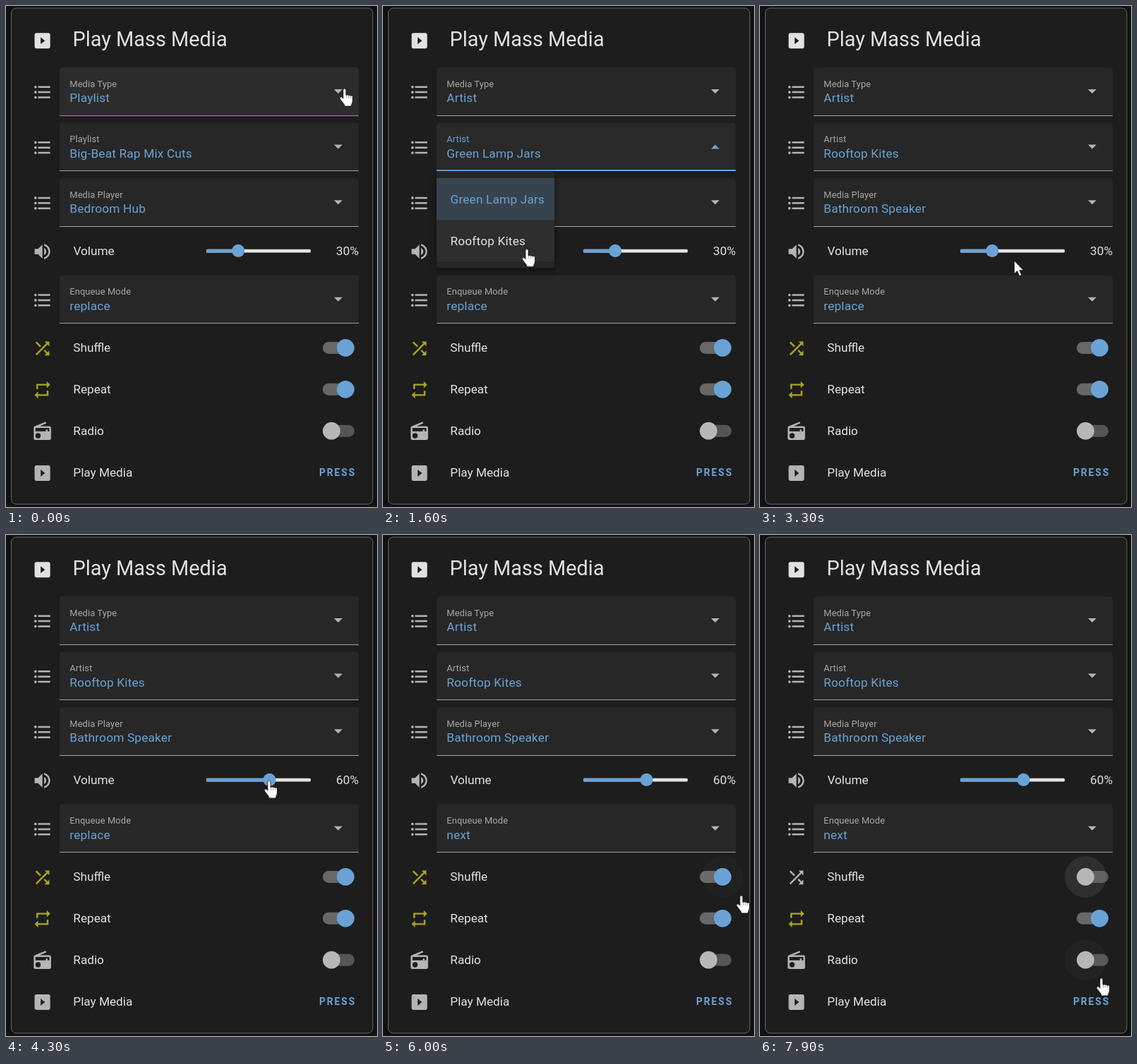
Recreate the animation shown at these times as an HTML page. Size 526 by 710 pixels, loop 8000 ms.

```html
<!DOCTYPE html>
<html lang="en">
<head>
<meta charset="utf-8">
<title>Play Mass Media</title>
<style>
html, body { margin: 0; width: 100%; height: 100%; overflow: hidden; background: #111; }
svg { display: block; width: 526px; height: 710px; font: 17.2px Roboto, sans-serif; }
.val, .item { font-size: 17.3px; letter-spacing: .16px; }
.label { font-size: 12.9px; letter-spacing: .1px; }
.press { font-size: 14px; font-weight: 600; letter-spacing: 1.8px; }
.menu { filter: drop-shadow(0 4px 5px rgba(0, 0, 0, .4)); }
</style>
</head>
<body>
<svg id="stage" viewBox="0 0 526 710"></svg>
<script>
const stage = document.getElementById('stage');
const LOOP = 8000, TICK = 100, SCALE = 1.229;
const BLUE = '#6aa2d5', TEXT = '#e1e1e1', GREY = '#b4b4b4', OLIVE = '#a9a621';
const LEFT = 76, RIGHT = 500, FIELD_H = 68.6, ITEM_H = 59, PAD = 9.8;

const dot = y => `M4,${y - 1.5}a1.5,1.5 0 0 1 0,3a1.5,1.5 0 0 1 0,-3M7,${y - 1}h14v2h-14z`;
const ICONS = {
  list: dot(6) + dot(12) + dot(18),
  play: 'M19,3H5C3.89,3 3,3.89 3,5V19A2,2 0 0,0 5,21H19A2,2 0 0,0 21,19V5C21,3.89 20.1,3 19,3M10,16V8L15,12',
  volume: 'M14,3.23V5.29C16.89,6.15 19,8.83 19,12C19,15.17 16.89,17.84 14,18.7V20.77C18,19.86 21,16.28 21,12C21,7.72 18,4.14 14,3.23M16.5,12C16.5,10.23 15.5,8.71 14,7.97V16C15.5,15.29 16.5,13.76 16.5,12M3,9V15H7L12,20V4L7,9H3Z',
  shuffle: 'M14.83,13.41L13.42,14.82L16.55,17.95L14.5,20H20V14.5L17.96,16.54L14.83,13.41M14.5,4L16.54,6.04L4,18.59L5.41,20L17.96,7.46L20,9.5V4M10.59,9.17L5.41,4L4,5.41L9.17,10.58L10.59,9.17Z',
  repeat: 'M17,17H7V14L3,18L7,22V19H19V13H17M7,7H17V10L21,6L17,2V5H5V11H7V7Z',
  radio: 'M20,6A2,2 0 0,1 22,8V20A2,2 0 0,1 20,22H4A2,2 0 0,1 2,20V8C2,7.15 2.53,6.42 3.28,6.13L15.71,1L16.47,2.83L8.83,6H20M20,8H4V12H16V10H18V12H20V8M7,14A3,3 0 0,0 4,17A3,3 0 0,0 7,20A3,3 0 0,0 10,17A3,3 0 0,0 7,14Z'
};

// Each select: open and close times, and the value before and after the choice.
const FIELDS = [
  { y: 86.8, label: () => 'Media Type', open: 200, close: 800, from: 'Playlist', to: 'Artist', w: 138,
    items: ['Artist', 'Album', 'Track', 'Playlist', 'Radio'] },
  { y: 165.4, label: t => t < 800 ? 'Playlist' : 'Artist', open: 1400, close: 1800,
    from: 'Green Lamp Jars', to: 'Rooftop Kites', w: 167, items: ['Green Lamp Jars', 'Rooftop Kites'] },
  { y: 244, label: () => 'Media Player', open: 2400, close: 3000, from: 'Bedroom Hub', to: 'Bathroom Speaker',
    w: 255, scroll: true,
    items: ['All Speakers', 'Bathroom Speaker', 'Bedroom Hub', 'Broadcast Speakers',
      'Deck Soundbridge', 'Dining Room Hub', 'HASS Media Player'] },
  { y: 381.6, label: () => 'Enqueue Mode', open: 4800, close: 5300, from: 'replace', to: 'next', w: 138,
    items: ['play', 'replace', 'next', 'replace_next', 'add'] }
];

// Pointer path: time, x, y of the hot spot.
const PATH = [
  [0, 480, 117], [200, 479, 119], [600, 150, 196], [800, 146, 198], [1300, 470, 203], [1400, 468, 204],
  [1600, 204, 344.5], [1800, 200, 343], [2300, 462, 284], [2400, 452, 286], [2600, 249.7, 336], [2900, 208, 412],
  [3000, 210, 412], [3300, 360.5, 361], [3700, 329, 347], [3800, 329, 347], [4300, 373, 348], [4600, 448, 414],
  [4800, 440, 418], [4900, 211, 585], [5200, 207, 604], [5300, 210, 602], [5700, 482, 486], [6000, 508, 511],
  [6400, 478, 488], [6700, 478, 488], [7200, 486, 589], [7500, 486, 589], [7600, 486, 602], [7700, 486, 602],
  [7900, 484, 628], [8000, 484, 628]
];

const between = (t, a, b) => t >= a && t < b;
const text = (x, y, s, fill = TEXT, cls = '', extra = '') =>
  `<text x="${x}" y="${y}" fill="${fill}" class="${cls}" ${extra}>${s}</text>`;
const rect = (x, y, w, h, fill, r = 0) =>
  `<rect x="${x}" y="${y}" width="${w}" height="${h}" rx="${r}" fill="${fill}"/>`;
const circle = (x, y, r, fill) => `<circle cx="${x}" cy="${y}" r="${r}" fill="${fill}"/>`;
const path = (d, fill, extra = '') => `<path d="${d}" fill="${fill}" ${extra}/>`;
const icon = (name, y, fill = GREY) => path(ICONS[name], fill,
  `fill-rule="evenodd" transform="translate(${51.6 - 12 * SCALE} ${y - 12 * SCALE}) scale(${SCALE})"`);

function pointerAt(t) {
  const i = Math.max(1, PATH.findIndex(p => p[0] >= t));
  const [t0, x0, y0] = PATH[i - 1], [t1, x1, y1] = PATH[i];
  const k = (t - t0) / (t1 - t0);
  return {
    x: x0 + (x1 - x0) * k, y: y0 + (y1 - y0) * k,
    arrow: between(t, 2500, 2750) || between(t, 3100, 3600)
  };
}

const isOpen = (f, t) => between(t, f.open, f.close);

function valueOf(f, t) {
  if (f === FIELDS[1] && t < 800) return 'Big-Beat Rap Mix Cuts';
  return t < f.close ? f.from : f.to;
}

// The underline sits on whole pixels; this is its lower edge.
const bottomOf = f => Math.floor(f.y + FIELD_H - .3) + 1;

function field(f, t, p, busy) {
  const open = isOpen(f, t), end = bottomOf(f), mid = f.y + 34.2;
  const hover = !busy && !p.arrow && between(p.x, LEFT, RIGHT) && between(p.y, f.y, end);
  const lineH = open ? 2 : 1, lineFill = open ? BLUE : hover ? '#bd894e' : '#a2a2a2';
  const d = open ? 3 : -3;
  return icon('list', f.y + 35.3) +
    path(`M${LEFT},${end}V${f.y + 5}q0,-5 5,-5H${RIGHT - 5}q5,0 5,5V${end}z`, hover ? '#2c2c2c' : open ? '#292929' : '#272727') +
    rect(LEFT, end - lineH, RIGHT - LEFT, lineH, lineFill) +
    text(90.3, f.y + 27.7, f.label(t), open ? BLUE : '#a8a8a8', 'label') +
    text(90.3, f.y + 49.2, valueOf(f, t), BLUE, 'val') +
    path(`M465,${mid + d}h12l-6,${-2 * d}z`, open ? BLUE : GREY);
}

function menu(f, t, p) {
  const top = bottomOf(f), h = f.items.length * ITEM_H + 2 * PAD, value = valueOf(f, t);
  const rowW = f.scroll ? f.w - 20 : f.w;
  const rows = f.items.map((s, i) => {
    const y = Math.floor(f.y + FIELD_H + PAD + .2) + i * ITEM_H, on = s === value;
    const hover = !p.arrow && between(p.x, LEFT, LEFT + rowW) && between(p.y, y, y + ITEM_H);
    return (on || hover ? rect(LEFT, y, rowW, ITEM_H, on ? '#37434f' : '#2e2e2e') : '') +
      text(95.5, y + 35.6, s, on ? BLUE : TEXT, 'item');
  }).join('');
  const x = LEFT + rowW;
  const bar = f.scroll ? rect(x, top, 20, h, '#424242') + path(`M${x + 5.5},${top + 13}h9l-4.5,-5z`, '#858585') +
    rect(x + 2, top + 20, 17, h, '#686868') : '';
  return `<g class="menu">${rect(LEFT, top, f.w, h, '#262626', 4)}</g>${rows}${bar}`;
}

function toggle(y, on, ripple) {
  const x = on ? 481.4 : 461.5;
  return rect(449, y - 8.5, 45, 17, on ? '#676767' : '#555', 8.5) +
    (ripple ? circle(x, y, 29.3, `rgba(255,255,255,${ripple})`) : '') +
    circle(x, y + .8, 12.5, 'rgba(0,0,0,.25)') + circle(x, y, 12.4, on ? BLUE : '#b7b7b7');
}

function slider(t) {
  const v = Math.round(30 + 30 * Math.min(1, Math.max(0, (t - 3800) / 500))), x = 284.8 + 1.48 * v;
  return rect(284, 344.8, 148, 4.6, '#e4e4e4', 1.5) + rect(284, 344.8, x - 284, 4.6, BLUE, 1.5) +
    circle(x, 346.9, 9.1, BLUE) + text(500, 353, v + '%', TEXT, '', 'text-anchor="end"');
}

function pointer(p) {
  const edge = 'stroke="#161616" stroke-width=".8"';
  const shape = p.arrow
    ? path('M0,0V18.5L4.3,14.5L7.2,21.5L10.2,20.2L7.4,13.5H13z', '#fff', edge)
    : path('M5.5,2a2,2 0 0 1 4,0v7.2l1,.2a1.7,1.7 0 0 1 2.8,.5a1.7,1.7 0 0 1 2.8,.7a1.7,1.7 0 0 1 2.9,1.2v5.2c0,3 -1.6,4.5 -2,7v1h-9.5v-1.2c-1,-2.6 -3.8,-5.4 -6.3,-9a1.8,1.8 0 0 1 3,-2l1.3,1.5z', '#fff', edge) +
      path('M10.3,10v3.6M13.2,10.5v3.1M16,11.2v2.6', 'none', 'stroke="#555" stroke-width=".6"');
  return `<g transform="translate(${p.x - (p.arrow ? 0 : 7.5)} ${p.y})">${shape}</g>`;
}

function draw(t) {
  const p = pointerAt(t), opened = FIELDS.find(f => isOpen(f, t)), shuffle = t < 6500;
  const shuffleRipple = !shuffle ? .08 : between(t, 5700, 6000) || t >= 6200 ? .04 : between(t, 6000, 6100) ? .02 : 0;
  const radioRipple = t >= 7800 ? .025 : t >= 7100 ? .04 : 0;
  stage.innerHTML = rect(0, 0, 526, 710, '#111') +
    '<rect x="7.5" y="3" width="512.5" height="703" rx="7" fill="#1d1d1d" stroke="#686868"/>' +
    icon('play', 49.2, TEXT) + text(94.5, 57, 'Play Mass Media', TEXT, '', 'font-size="28.9"') +
    FIELDS.map(f => field(f, t, p, opened)).join('') +
    icon('volume', 348) + text(95.5, 353, 'Volume') + slider(t) +
    icon('shuffle', 485.3, shuffle ? OLIVE : GREY) + text(95.3, 490.3, 'Shuffle') + toggle(484.4, shuffle, shuffleRipple) +
    icon('repeat', 544, OLIVE) + text(95.3, 549.2, 'Repeat') + toggle(543.3, true, 0) +
    icon('radio', 602.8) + text(95.3, 608.2, 'Radio') + toggle(602.2, false, radioRipple) +
    icon('play', 662) + text(95.3, 667.2, 'Play Media') + text(444, 666, 'PRESS', BLUE, 'press') +
    (opened ? menu(opened, t, p) : '') + pointer(p);
}

const start = performance.now();
let shown = -1;
function frame() {
  const t = Math.floor((performance.now() - start) % LOOP / TICK) * TICK;
  if (t !== shown) draw(shown = t);
  requestAnimationFrame(frame);
}
frame();
</script>
</body>
</html>
```
